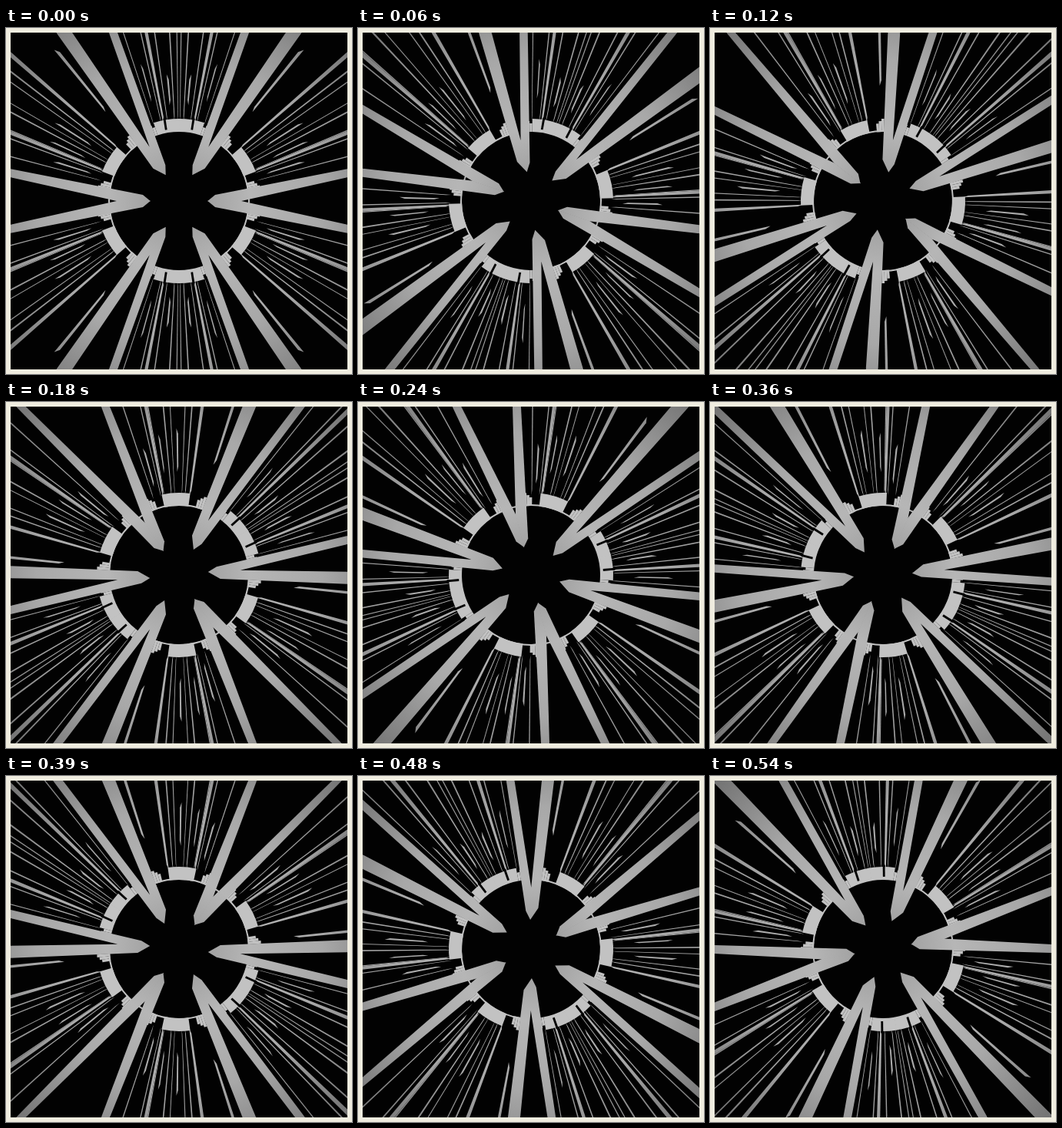
Animation of 450x450 px, one loop 570 ms. Source, as an HTML page:

```html
<!DOCTYPE html>
<html lang="en">
<head>
<meta charset="utf-8">
<title>Spinning tunnel</title>
<style>
html, body { margin: 0; width: 100%; height: 100%; overflow: hidden; background: #efecdf; }
svg { display: block; width: 100vw; height: 100vh; }
</style>
</head>
<body>
<svg viewBox="0 0 450 450">
  <defs>
    <clipPath id="stage"><rect x="6" y="6" width="438" height="438"/></clipPath>
    <radialGradient id="steel" gradientUnits="userSpaceOnUse" cx="0" cy="0" r="310">
      <stop offset=".12" stop-color="#a2a2a2"/>
      <stop offset=".3" stop-color="#b6b6b6"/>
      <stop offset=".6" stop-color="#a8a8a8"/>
      <stop offset="1" stop-color="#727272"/>
    </radialGradient>
    <g id="quarter"></g>
  </defs>
  <g clip-path="url(#stage)">
    <rect x="6" y="6" width="438" height="438" fill="#020202"/>
    <g id="wheel">
      <use href="#quarter"/>
      <use href="#quarter" transform="scale(-1 1)"/>
      <use href="#quarter" transform="scale(1 -1)"/>
      <use href="#quarter" transform="scale(-1 -1)"/>
    </g>
  </g>
</svg>
<script>
const STEP = 30, STEPS = 19, FAR = 320;
const INNER = 90, OUTER = 107;
const STEEL = 'url(#steel)', PALE = '#c2c2c2', BLACK = '#020202';
const quarter = document.getElementById('quarter');
const wheel = document.getElementById('wheel');

let seed = 11;
function rand(lo, hi) {
  seed = (seed * 16807) % 2147483647;
  return lo + (hi - lo) * seed / 2147483647;
}

// Polar point, angle in degrees, counter-clockwise from the right
function at(r, deg) {
  const a = deg * Math.PI / 180;
  return (r * Math.cos(a)).toFixed(2) + ' ' + (-r * Math.sin(a)).toFixed(2);
}

function shape(d, fill) {
  const p = document.createElementNS('http://www.w3.org/2000/svg', 'path');
  p.setAttribute('d', d);
  p.setAttribute('fill', fill);
  quarter.appendChild(p);
}

function poly(points, fill = STEEL) {
  shape('M' + points.join('L') + 'Z', fill);
}

function ray(deg, width, from = 104, to = FAR) {
  const h = width / 2;
  poly([at(from, deg - h), at(to, deg - h), at(to - 7, deg + h), at(from + 7, deg + h)]);
}

function band(a, b, inner = INNER, outer = OUTER) {
  shape(`M${at(outer, a)}A${outer} ${outer} 0 0 0 ${at(outer, b)}` +
        `L${at(inner, b)}A${inner} ${inner} 0 0 1 ${at(inner, a)}Z`, PALE);
}

// Fine streaks fan out evenly with a little jitter; every third is a short sliver
function streaks(from, to, count) {
  for (let i = 0; i < count; i++) {
    const deg = from + (to - from) * (i + rand(0.3, 0.7)) / count;
    if (i % 3 === 1) {
      const r = rand(118, 140);
      ray(deg, rand(0.5, 0.8), r, r + rand(40, 70));
    } else {
      ray(deg, rand(0.25, 0.5));
    }
  }
}

// Three blocks climbing the ring beside a pillar
function stairs(deg, dir) {
  for (let k = 0; k < 3; k++) {
    const a = deg + dir * k * 2, b = a + dir * 2;
    band(Math.min(a, b), Math.max(a, b), INNER, OUTER - 3 * k);
  }
}

// Forked pillar: lateral slopes of the prongs are given as angles at the far end
function pillar(tip, low, high, prongs) {
  const [a, b, c, d] = prongs;
  poly([at(38, tip), at(54, low), at(FAR, a), at(FAR, b), at(80, (low + high) / 2 + 1),
        at(FAR, c), at(FAR, d), at(50, high)]);
}

streaks(14, 39, 10);
streaks(71, 78, 3);
streaks(81, 90, 4);
for (const deg of [22, 41, 79]) ray(deg, 1.1);
ray(50.9, 0.9, 150, 255);

band(0, 53, INNER, 92);
band(21, 41);
band(72, 90.2);
stairs(9, 1);
stairs(53, -1);
stairs(66, 1);
poly([at(94, 78.9), at(109, 79.2), at(109, 80.7), at(94, 80.6)], BLACK);

pillar(63, 51.5, 69.3, [54, 57.3, 68.2, 70]);
// The lower half of this one comes from the mirrored quarter
poly(['37 .3', '47 -8', at(FAR, 10.9), at(FAR, 9.4), '80 .3']);

function draw(ms) {
  const i = Math.floor(ms / STEP) % STEPS;
  wheel.setAttribute('transform', `translate(225 225) rotate(${i * 180 / STEPS})`);
}

const start = performance.now();
function loop() {
  draw(performance.now() - start);
  requestAnimationFrame(loop);
}
draw(0);
requestAnimationFrame(loop);
</script>
</body>
</html>
```
